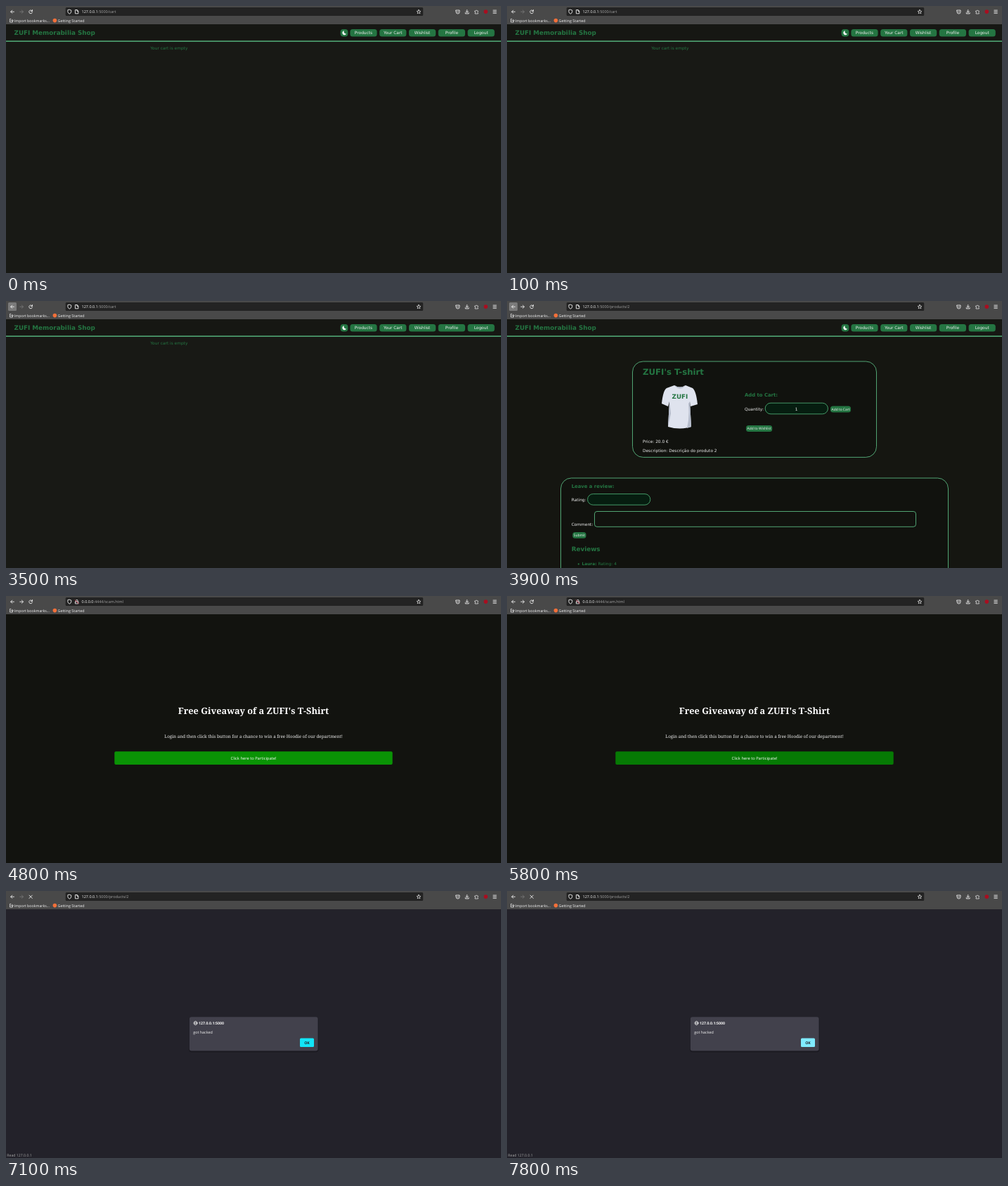
Write an HTML page that moves like this. It is 704 px wide and 380 px high and loops after 8000 ms.

```html
<!DOCTYPE html>
<html lang="en">
<head>
<meta charset="utf-8">
<title>Shop walkthrough</title>
<style>
html, body { margin: 0; width: 704px; height: 380px; overflow: hidden; background: #171814; }
svg { display: block; }
text { font: 5.867px "DejaVu Sans", Verdana, sans-serif; fill: #eee; text-rendering: geometricPrecision; white-space: pre; }
.ui text { font: 5.4px "Open Sans", "Noto Sans", sans-serif; fill: #f4f4f4; }
.ui .bold { font-weight: 700; font-size: 5.25px; }
.dim { fill: #a5a5a5; }
.green { fill: #247542; }
text.green { fill: #247542; }
.h1, .h2, .h3, .strong { font-weight: 700; }
text.h1 { font-size: 11.73px; }
text.h2 { font-size: 8.8px; }
text.h3 { font-size: 6.864px; }
text.small { font: 4.89px "Noto Sans", "Open Sans", sans-serif; }
text.serif { font-family: "Noto Serif", serif; font-size: 6.26px; }
text.headline { font-size: 12.75px; font-weight: 700; fill: #fff; }
text.action { font: 5.77px "Open Sans", "Noto Sans", sans-serif; fill: #fff; }
.mid { text-anchor: middle; }
.line { fill: none; stroke: #eee; stroke-width: .9; stroke-linecap: round; stroke-linejoin: round; }
.card { fill: #11120e; stroke: #58b47e; stroke-width: .9; }
.field { fill: #061d10; stroke: #4aa870; stroke-width: .9; }
</style>
</head>
<body>
<svg width="704" height="380" viewBox="0 0 704 380">
  <rect id="backdrop" width="704" height="380"/>

  <g id="shop">
    <rect y="26" width="704" height="24" fill="#161713"/>
    <rect y="49.4" width="704" height="1.5" fill="#53ae79"/>
    <text class="green h2" x="11.5" y="41.2">ZUFI Memorabilia Shop</text>
    <rect class="green" x="475.6" y="33" width="10.8" height="10.6" rx="4"/>
    <path d="M480.8 35.2A3 3 0 1 0 484 39.5A3 3 0 0 1 480.8 35.2Z" fill="#fff"/>
    <g id="nav"></g>
  </g>

  <text id="cart" class="green" x="205.3" y="61.6">Your cart is empty</text>

  <g id="product">
    <rect class="card" x="178.5" y="86" width="347" height="136.4" rx="15"/>
    <text class="green h1" x="193" y="105">ZUFI's T-shirt</text>
    <path d="M238 120Q246 125 254 120L264 124Q269 128 271 147L261 150L260 143L262 179Q246 184 229 179L231 143L229 150L220 146Q222 127 227 124Z" fill="#dfe3ee"/>
    <path d="M238 120Q246 129 254 120Q246 125 238 120ZM260 143L262 179L256 181Q260 164 258 146ZM231 143L233 160L229 179Z" fill="#b5bccb"/>
    <text class="green h2 mid" x="246" y="138.5">ZUFI</text>
    <text class="green h3" x="338" y="136">Add to Cart:</text>
    <text x="338" y="155.6">Quantity:</text>
    <rect class="field" x="367.2" y="145.2" width="89.2" height="15.6" rx="7.8"/>
    <text class="mid" x="411.7" y="155.5">1</text>
    <rect class="green" x="460" y="149.5" width="29" height="9" rx="3.5"/>
    <text class="small mid" x="474.5" y="155.8">Add to Cart</text>
    <rect class="green" x="340" y="177" width="37.2" height="9" rx="3.5"/>
    <text class="small mid" x="358.6" y="183.2">Add to Wishlist</text>
    <text x="193" y="202">Price: 20.0 €</text>
    <text x="193" y="214.8">Description: Descrição do produto 2</text>

    <rect class="card" x="76.5" y="252" width="551" height="150" rx="15"/>
    <text class="green h3" x="91.7" y="265.8">Leave a review:</text>
    <text x="91.7" y="284.8">Rating:</text>
    <rect class="field" x="114.6" y="274.6" width="89.2" height="15.6" rx="7.8"/>
    <text x="91.7" y="320">Comment:</text>
    <rect class="card" x="124.5" y="299.5" width="457" height="21.8" rx="3.5"/>
    <rect class="green" x="93.3" y="329" width="19.2" height="8.8" rx="3.5"/>
    <text class="small mid" x="102.9" y="335.2">Submit</text>
    <text class="green h2" x="91.7" y="355.5">Reviews</text>
    <circle class="green" cx="101.8" cy="374.4" r="1.1"/>
    <text class="green" x="106.5" y="376.2"><tspan class="strong">Laura:</tspan> Rating: 4</text>
  </g>

  <g id="giveaway">
    <text class="serif headline mid" x="352" y="168">Free Giveaway of a ZUFI's T-Shirt</text>
    <text class="serif mid" x="352" y="202">Login and then click this button for a chance to win a free Hoodie of our department!</text>
    <rect id="join" x="154.3" y="221.3" width="395.4" height="18.7" rx="2"/>
    <text class="action mid" x="352" y="232.5">Click here to Participate!</text>
  </g>
  <text id="hacked" class="serif mid" x="352" y="265">YOU GOT HACKED!</text>

  <g id="dialog" class="ui">
    <rect x="260" y="179.5" width="184.5" height="50" rx="4" fill="#1b1a21"/>
    <rect x="260.8" y="179.2" width="182.8" height="48.2" rx="3" fill="#42414c"/>
    <g class="line" style="stroke-width:.6">
      <circle cx="269.6" cy="188" r="2.6"/>
      <ellipse cx="269.6" cy="188" rx="1.2" ry="2.6"/>
      <path d="M267 188h5.2"/>
    </g>
    <text class="bold" x="274" y="190">127.0.0.1:5000</text>
    <text x="266.3" y="203">got hacked</text>
    <rect id="ok" x="418" y="209.6" width="20" height="12.4" rx="1.5"/>
    <text class="bold mid" x="428" y="217.8" style="fill:#23222b">OK</text>
  </g>

  <g class="ui">
    <g id="status">
      <rect id="statusBox" y="372.5" width="118" height="7.5" fill="#2c2c29"/>
      <text id="statusText" x="1.3" y="378.3" style="font-size:5.2px"></text>
    </g>
    <rect width="704" height="26" fill="#494949"/>
    <rect x="84.7" y="2" width="508.5" height="12" rx="1.5" fill="#232323"/>
    <rect id="backHover" x="3" y="2" width="12" height="12" rx="1.5"/>
    <rect id="reloadHover" x="29" y="2" width="12" height="12" rx="1.5" fill="#686868"/>
    <g class="line">
      <path d="M11.4 8.2H6.8M8.8 6.1L6.7 8.2L8.8 10.3"/>
      <path id="forward" d="M19.8 8.2H24.4M22.4 6.1L24.5 8.2L22.4 10.3"/>
      <path id="reload" d="M37.2 7A2.4 2.4 0 1 0 37.5 9M37.5 5.5V7.4H35.5"/>
      <path id="fragment" d="M33.7 6.8L36.2 9.7"/>
      <path id="stop" d="M33 6.1L37.3 10.4M37.3 6.1L33 10.4"/>
      <path d="M90.3 5.2L92.7 6V8.3Q92.5 10.2 90.3 11.2Q88.1 10.2 87.9 8.3V6Z"/>
      <path id="page" d="M98.8 5.5H101.2L102.8 7.2V10.8H98.8ZM101 5.6V7.4H102.7"/>
      <path id="lock" d="M98.8 8H102.8V10.9H98.8ZM99.5 8V6.7A1.3 1.3 0 0 1 102.1 6.7V8"/>
      <path id="slash" d="M98.4 5.8L103.2 10.8" stroke="#e0435c"/>
      <path d="M587 5.3L587.8 7.2L589.9 7.4L588.3 8.7L588.8 10.8L587 9.7L585.2 10.8L585.7 8.7L584.1 7.4L586.2 7.2Z" style="stroke-width:.7"/>
      <path d="M640 6H645V8.5A2.5 2.5 0 0 1 640 8.5ZM641.2 7.8L642.5 9L643.8 7.8"/>
      <path d="M655.7 5.5V9M654 7.6L655.7 9.2L657.4 7.6M653.3 9.5V10.9H658.1V9.5"/>
      <path d="M667 7H668.2A.9 .9 0 0 1 670 7H671.3V8.3A.9 .9 0 0 0 671.3 10V11H667V9.8A.8 .8 0 0 0 667 8.2Z" style="stroke-width:.7"/>
      <path d="M692.9 6.1H697.3M692.9 8.2H697.3M692.9 10.3H697.3"/>
      <path d="M6.8 18.4H5.5V23H9.5V21.8M6.8 20.7H10M8.6 19.1L10.1 20.7L8.6 22.2" style="stroke-width:.7"/>
    </g>
    <circle cx="682.3" cy="8.1" r="2.8" fill="#a80e20"/>
    <circle cx="69.4" cy="20.6" r="2.8" fill="#f3703a"/>
    <text x="107.6" y="10.2" style="font-size:5.48px"><tspan id="host"></tspan><tspan id="path" class="dim"></tspan></text>
    <text x="11.8" y="22.7" style="font-size:5.3px">Import bookmarks…</text>
    <text x="73.5" y="22.7">Getting Started</text>
  </g>
</svg>
<script>
const LOOP = 8000;
const $ = id => document.getElementById(id);
const show = (id, on) => $(id).style.display = on ? "" : "none";
const fill = (id, color) => $(id).setAttribute("fill", color);
const write = (id, text) => $(id).textContent = text;

$("nav").innerHTML = ["Products", "Your Cart", "Wishlist", "Profile", "Logout"].map((label, i) => {
  const x = 489.4 + i * 41.8;
  return `<rect class="green" x="${x}" y="33" width="38.2" height="10.6" rx="3.5"/>
    <text class="mid" x="${x + 19.1}" y="40.2">${label}</text>`;
}).join("");

function draw(t) {
  const within = (from, to) => t >= from && t < to;
  const cart = t < 3700, product = within(3700, 4100);
  const giveaway = within(4100, 7100), hacked = within(6900, 7100);
  const dialog = t >= 7100, leaving = t >= 7000;
  const scamUrl = giveaway && !leaving;

  fill("backdrop", dialog ? "#23222a" : giveaway ? "#12130f" : product ? "#151611" : "#181915");
  show("shop", cart || product);
  show("cart", cart);
  show("product", product);
  show("giveaway", giveaway);
  show("hacked", hacked);
  show("dialog", dialog);

  $("giveaway").setAttribute("transform", `translate(0 ${hacked ? -3.7 : 0})`);
  fill("join", t < 5700 ? "#0a9305" : t < 5800 ? "#078604" : "#067a04");
  fill("ok", t < 7800 ? "#12e6f8" : "#80ebff");

  // Toolbar
  show("backHover", within(3000, 4800));
  fill("backHover", within(3500, 3700) || within(3900, 4100) ? "#7a7a7a" : "#666");
  show("reloadHover", within(2600, 2700));
  $("forward").style.stroke = product || scamUrl ? "#eee" : "#777";
  show("reload", !leaving);
  show("fragment", leaving && !dialog);
  show("stop", dialog);
  show("page", !scamUrl);
  show("lock", scamUrl);
  show("slash", scamUrl);
  write("host", scamUrl ? "0.0.0.0" : "127.0.0.1");
  write("path", cart ? ":5000/cart" : scamUrl ? ":4444/scam.html" : ":5000/products/2");

  show("status", leaving);
  show("statusBox", !dialog);
  write("statusText", dialog ? "Read 127.0.0.1" : "127.0.0.1");
  $("statusText").style.fill = dialog ? "#a5a5a5" : "#f4f4f4";
}

function tick() {
  draw(performance.now() % LOOP);
  requestAnimationFrame(tick);
}
tick();
</script>
</body>
</html>
```
